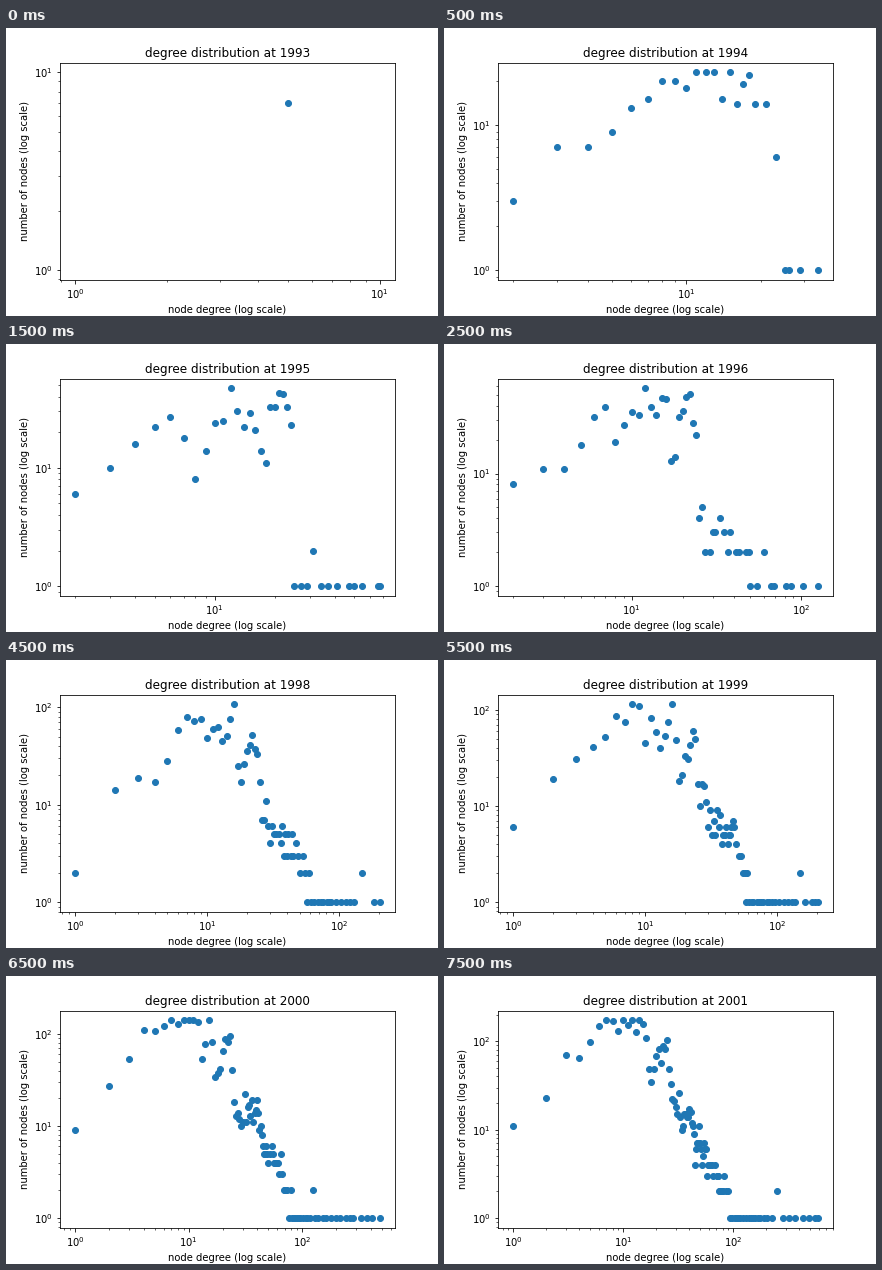
A matplotlib script that plays this animation: 432x288 px, repeating every 8 s.

```python
import math

import matplotlib.pyplot as plt
import numpy as np
from matplotlib.animation import FuncAnimation

# (degree, count) points that shape each year's curve
KEYS = {
    1993: [(5, 7)],
    1994: [(2, 3), (6, 13), (12, 23), (21, 14), (25, 1), (34, 1)],
    1995: [(2, 6), (6, 27), (8, 8), (12, 47), (17, 14), (21, 43), (24, 23),
           (25, 1), (67, 1)],
    1997: [(1, 1), (2, 11), (4, 7), (6, 39), (9, 52), (13, 50), (16, 100),
           (17, 13), (21, 54), (24, 22), (26, 5), (33, 4), (49, 2), (83, 1),
           (125, 1)],
    1999: [(1, 6), (3, 31), (5, 52), (9, 110), (13, 40), (16, 114), (18, 18),
           (23, 60), (25, 17), (36, 6), (47, 6), (55, 2), (75, 1), (202, 1)],
    2000: [(1, 9), (3, 54), (6, 122), (12, 135), (13, 53), (15, 140), (17, 34),
           (23, 94), (25, 18), (41, 14), (45, 6), (61, 4), (90, 1), (480, 1)],
    2001: [(1, 11), (2, 23), (3, 70), (6, 149), (12, 172), (15, 157), (17, 48),
           (23, 88), (33, 14), (41, 16), (46, 6), (72, 3), (110, 1), (585, 1)],
}


def histogram(year):
    """Log-log curve through the key points with noise; gaps widen along the tail."""
    keys = dict(KEYS[year])
    degrees, values = list(keys), list(keys.values())
    rng = np.random.default_rng(year)
    dense = 20 + 5.2 * (year - 1995)  # degrees up to here are nearly all present
    counts = {}
    d = degrees[0]
    while d < degrees[-1]:
        level = np.interp(math.log(d), np.log(degrees), np.log(values))
        noisy = round(math.exp(level + rng.normal(0, 0.25)))
        counts[d] = min(max(noisy, 1), max(values))
        d += max(1, round((d / dense) ** 2 * rng.uniform(0.5, 1.5)))
    return counts | keys


def blend(a, b):
    """Year in between: geometric mean of shared degrees, half of the others."""
    mixed = {d: round(math.sqrt(a[d] * b[d])) for d in a.keys() & b.keys()}
    rest = sorted(a.keys() ^ b.keys())[1::2]
    return mixed | {d: a.get(d) or b.get(d) for d in rest}


years = {year: histogram(year) for year in KEYS}
for year in (1996, 1998):
    years[year] = blend(years[year - 1], years[year + 1])

fig, ax = plt.subplots(figsize=(6, 4), dpi=72)
fig.subplots_adjust(left=0.125, right=0.9, bottom=0.125, top=0.88)


def draw(step):
    year = 1993 + (step + 1) // 2
    counts = years[year]
    ax.clear()
    ax.set_xscale("log")
    ax.set_yscale("log")
    ax.scatter(list(counts), list(counts.values()))
    ax.set_title(f"degree distribution at {year}")
    ax.set_xlabel("node degree (log scale)")
    ax.set_ylabel("number of nodes (log scale)")


anim = FuncAnimation(fig, draw, frames=16, interval=500, init_func=lambda: None,
                     repeat=True, repeat_delay=0)
plt.show()
```
